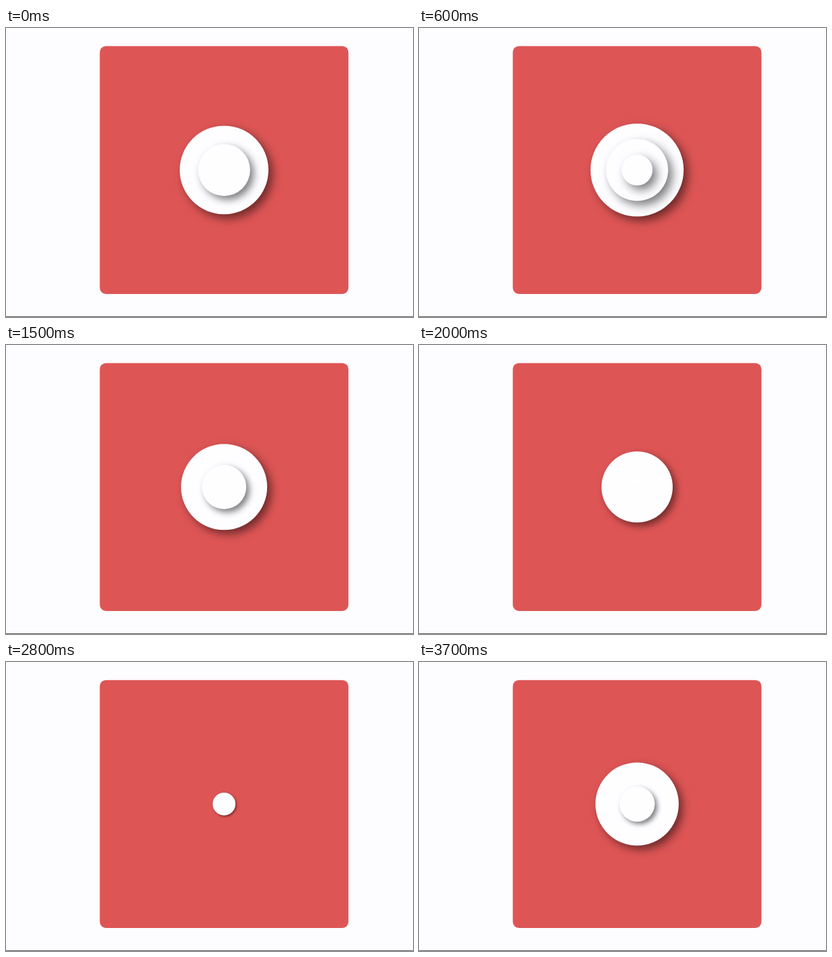
Write an HTML page with a canvas that moves like this. It is 600 px wide and 427 px high and loops after 3800 ms.

```html
<!DOCTYPE html>
<html lang="en">
<head>
<meta charset="utf-8">
<title>Pulsing discs</title>
<style>
  html, body { margin: 0; width: 100%; height: 100%; overflow: hidden; background: #fdfcff; }
  canvas { display: block; }
</style>
</head>
<body>
<canvas id="stage" width="600" height="427"></canvas>
<script>
const ctx = document.getElementById('stage').getContext('2d');
const LOOP = 3800, STEP = 100;
const HALF = 2000, PEAK = 670;
const CX = 321.5, CY = 209.8;

const easeOut = x => 1 - (1 - x) ** 2.65;
const burstOut = x => 1 - 0.42 * (1 - x) ** 2 - 0.58 * (1 - x) ** 6;

// Each disc starts a third of the swing after the one below it.
const discs = [
  { radius: 68.7, start: 0, ease: burstOut },
  { radius: 45.8, start: 1 / 3, ease: easeOut },
  { radius: 22.9, start: 2 / 3, ease: easeOut }
];

function drawStage() {
  ctx.fillStyle = '#fdfcff';
  ctx.fillRect(0, 0, 600, 427);
  ctx.fillStyle = '#de5555';
  ctx.beginPath();
  ctx.roundRect(138.3, 26.7, 366.5, 366.3, 9);
  ctx.fill();
  ctx.fillStyle = '#5c5a5c';
  ctx.fillRect(0, 426, 600, 1);
}

function drawDisc(radius, scale) {
  ctx.save();
  ctx.shadowColor = 'rgba(0, 0, 0, 0.5)';
  ctx.shadowOffsetX = ctx.shadowOffsetY = 6.5 * scale;
  ctx.shadowBlur = 14 * scale;
  ctx.fillStyle = '#fefdff';
  ctx.beginPath();
  ctx.arc(CX, CY, radius * scale, 0, Math.PI * 2);
  ctx.fill();
  ctx.restore();
}

function draw(ms) {
  const t = Math.floor(ms % LOOP / STEP) * STEP;
  const swing = Math.abs(1 - Math.abs(t - PEAK) / HALF);
  drawStage();
  for (const { radius, start, ease } of discs) {
    const x = (swing - start) / (1 - start);
    if (x > 0) drawDisc(radius, ease(x));
  }
}

const begin = performance.now();
function tick() {
  draw(performance.now() - begin);
  requestAnimationFrame(tick);
}
tick();
</script>
</body>
</html>
```
